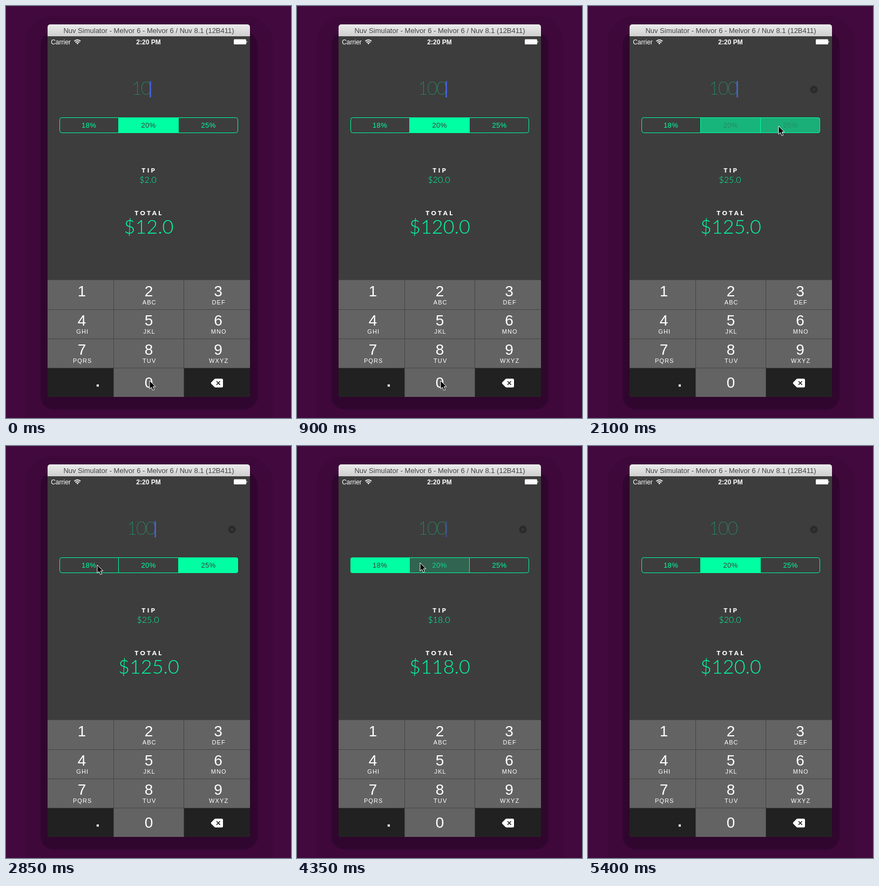
An HTML page for the animation above (5500 ms loop, 528 by 762 pixels).

```html
<!DOCTYPE html>
<html lang="en">
<head>
<meta charset="utf-8">
<title>Tip calculator</title>
<style>
  html, body { margin: 0; width: 100%; height: 100%; overflow: hidden; background: #42093f; }
  svg { display: block; width: 528px; height: 762px; }
  text { font-family: "Liberation Sans", Arial, sans-serif; text-anchor: middle; }
  .light { font-family: Lato, sans-serif; font-weight: 300; fill: #00ffa2; }
  .bill { font-size: 33px; font-weight: 100; letter-spacing: -1.8px; }
  .caption { font: 900 11.5px Lato, sans-serif; letter-spacing: 3.4px; fill: #fff; }
  .status { font-size: 12px; fill: #fff; }
  .label { font-size: 13px; letter-spacing: .4px; }
  .digit { font-size: 28px; fill: #fff; }
  .letters { font-size: 11px; letter-spacing: 1.1px; fill: #fff; }
</style>
</head>
<body>
<svg viewBox="0 0 528 762">
  <defs>
    <linearGradient id="bar" x2="0" y2="1">
      <stop stop-color="#ececec"/><stop offset="1" stop-color="#cfcfcf"/>
    </linearGradient>
    <clipPath id="window"><rect x="77" y="34" width="375" height="689" rx="5"/></clipPath>
  </defs>

  <rect x="36" y="18" width="458" height="790" rx="50" fill="#3e083b"/>
  <rect x="64" y="48" width="402" height="698" rx="24" fill="#30062e"/>

  <g clip-path="url(#window)">
    <rect x="77" y="34" width="375" height="689" fill="#3d3d3d"/>
    <rect x="77" y="34" width="375" height="22" fill="url(#bar)"/>
    <text x="264.5" y="50" font-size="13" fill="#424242">Nuv Simulator - Melvor 6 - Melvor 6 / Nuv 8.1 (12B411)</text>

    <text class="status" x="101.5" y="71">Carrier</text>
    <text class="status" x="264" y="71" font-weight="700">2:20 PM</text>
    <g fill="none" stroke="#fff" stroke-width="1.7">
      <path d="M126.5 65.2Q132.3 60 138.1 65.2M128.7 67.5Q132.3 64.3 135.9 67.5"/>
      <path d="M130.3 68.8Q132.3 67.2 134.3 68.8L132.3 71Z" fill="#fff" stroke="none"/>
    </g>
    <rect x="422" y="61.5" width="23" height="9.5" rx="1.5" fill="#fff"/>
    <path d="M445.7 64.3Q448 66.2 445.7 68.2Z" fill="#fff"/>

    <text id="bill" class="light bill" x="250" y="164"></text>
    <rect id="caret" y="139" width="2.5" height="30" fill="#4664e2"/>
    <g id="clear">
      <circle cx="418.5" cy="154.5" r="7.2" fill="#2b2b2b"/>
      <path d="M416.5 152.5l4 4m0-4l-4 4" stroke="#3d3d3d" stroke-width="1.2"/>
    </g>

    <g id="segments"></g>
    <path d="M208.5 206.5V234.5M319.5 206.5V234.5" stroke="#00ffa2"/>
    <rect x="99.5" y="206.5" width="330" height="28" rx="4" fill="none" stroke="#00ffa2"/>

    <text class="caption" x="265.3" y="308">TIP</text>
    <text id="tip" class="light" x="263" y="327" font-size="16"></text>
    <text class="caption" x="265" y="387">TOTAL</text>
    <text id="total" class="light" x="264.5" y="421" font-size="36"></text>

    <rect x="77" y="506" width="375" height="217" fill="#454545"/>
    <g id="keys"></g>
    <path d="M380.3 696L386 690.2Q387 689.2 388.5 689.2H399.5Q402 689.2 402 691.7V703Q402 705.5 399.5 705.5H388.5Q387 705.5 386 704.5L380.3 698.7Q379 697.4 380.3 696Z" fill="#fff"/>
    <path d="M390 694l6.6 6.6m0-6.6l-6.6 6.6" stroke="#212121" stroke-width="1.6"/>
  </g>

  <path id="pointer" d="M0 0V15.2L3.4 12 6 17.8 8.7 16.6 6.2 11H11Z" fill="#000" stroke="#fff" stroke-linejoin="round"/>
</svg>

<script>
const LOOP = 5500, TICK = 150;
const BASE = [61, 61, 61], ACCENT = [0, 255, 162];
const byId = id => document.getElementById(id);

function add(parent, tag, attrs, content = '') {
  const node = document.createElementNS('http://www.w3.org/2000/svg', tag);
  for (const name in attrs) node.setAttribute(name, attrs[name]);
  node.textContent = content;
  return parent.appendChild(node);
}

const mix = (a, b, k) => `rgb(${a.map((v, i) => Math.round(v + (b[i] - v) * k))})`;

// Tracks hold [tick, ...value] entries; each value stays until the next entry.
const latest = (track, tick) => track.filter(entry => entry[0] <= tick).pop();

const rateTrack = [[0, 20], [14, 25], [23, 18], [30, 20]];
const pointerTrack = [
  [0, 266, 693], [9, 272, 660], [10, 300, 520], [11, 335, 330], [12, 353, 222],
  [15, 250, 220], [16, 190, 220], [17, 169, 220], [28, 200, 218], [29, 228, 216],
  [31, 300, 370], [32, 418, 614], [33, -50, -50]
];
const blinkStarts = [3, 10, 16, 23, 29, 35];
const blink = [.4, 0, .4];

const segments = [
  { rate: 18, x: 99, width: 110, middle: 153.5,
    fill: [[0, 0], [22, .2], [23, .6], [24, .92], [25, 1], [30, .6], [31, .18], [32, 0]] },
  { rate: 20, x: 208, width: 112, middle: 264,
    fill: [[0, 1], [14, .62], [15, 0], [29, .2], [30, .6], [31, .92], [32, 1]] },
  { rate: 25, x: 319, width: 111, middle: 375,
    fill: [[0, 0], [13, .2], [14, .58], [15, 1], [23, .6], [24, .18], [25, 0]] }
];
for (const s of segments) {
  s.box = add(byId('segments'), 'rect', { x: s.x, y: 206, width: s.width, height: 29, rx: s.rate === 20 ? 0 : 4 });
  s.label = add(byId('segments'), 'text', { class: 'label', x: s.middle, y: 225 }, s.rate + '%');
}

const columns = [
  { x: 77, width: 122, middle: 140.5 },
  { x: 200, width: 129, middle: 264.5 },
  { x: 330, width: 122, middle: 393 }
];
const letters = ['', 'ABC', 'DEF', 'GHI', 'JKL', 'MNO', 'PQRS', 'TUV', 'WXYZ'];

function addKey(index, digit, fill) {
  const { x, width, middle } = columns[index % 3];
  const row = Math.floor(index / 3), y = row ? 508 + 54 * row : 507;
  const key = add(byId('keys'), 'rect', { x, y, width, height: row ? 53 : 54, fill });
  add(byId('keys'), 'text', { class: 'digit', x: middle, y: row < 3 ? 537 + 54 * row : 706 }, digit);
  add(byId('keys'), 'text', { class: 'letters', x: middle + 1.2, y: 552 + 54 * row }, letters[index]);
  return key;
}
letters.forEach((_, i) => addKey(i, i + 1, '#636363'));
addKey(9, '', '#212121');
const zeroKey = addKey(10, 0, '#636363');
addKey(11, '', '#212121');
add(byId('keys'), 'text', { class: 'digit', x: 170, y: 704, 'font-weight': 700 }, '.');

function draw(tick) {
  const bill = tick < 6 ? 10 : 100;
  const tip = bill * latest(rateTrack, tick)[1] / 100;
  byId('bill').textContent = bill;
  byId('tip').textContent = '$' + tip.toFixed(1);
  byId('total').textContent = '$' + (bill + tip).toFixed(1);

  const start = blinkStarts.filter(s => s <= tick).pop();
  byId('caret').setAttribute('x', bill === 10 ? 266.2 : 275.3);
  byId('caret').setAttribute('opacity', blink[tick - start] ?? 1);
  byId('clear').setAttribute('opacity', tick < 12 ? 0 : 1);

  for (const s of segments) {
    const amount = latest(s.fill, tick)[1];
    s.box.setAttribute('fill', mix(BASE, ACCENT, amount));
    s.label.setAttribute('fill', mix(ACCENT, BASE, amount));
  }
  zeroKey.setAttribute('fill', tick === 5 ? '#212121' : '#636363');

  const [, x, y] = latest(pointerTrack, tick);
  byId('pointer').setAttribute('transform', `translate(${x} ${y})`);
}

const began = performance.now();
function frame() {
  draw(Math.floor((performance.now() - began) % LOOP / TICK));
  requestAnimationFrame(frame);
}
frame();
</script>
</body>
</html>
```
